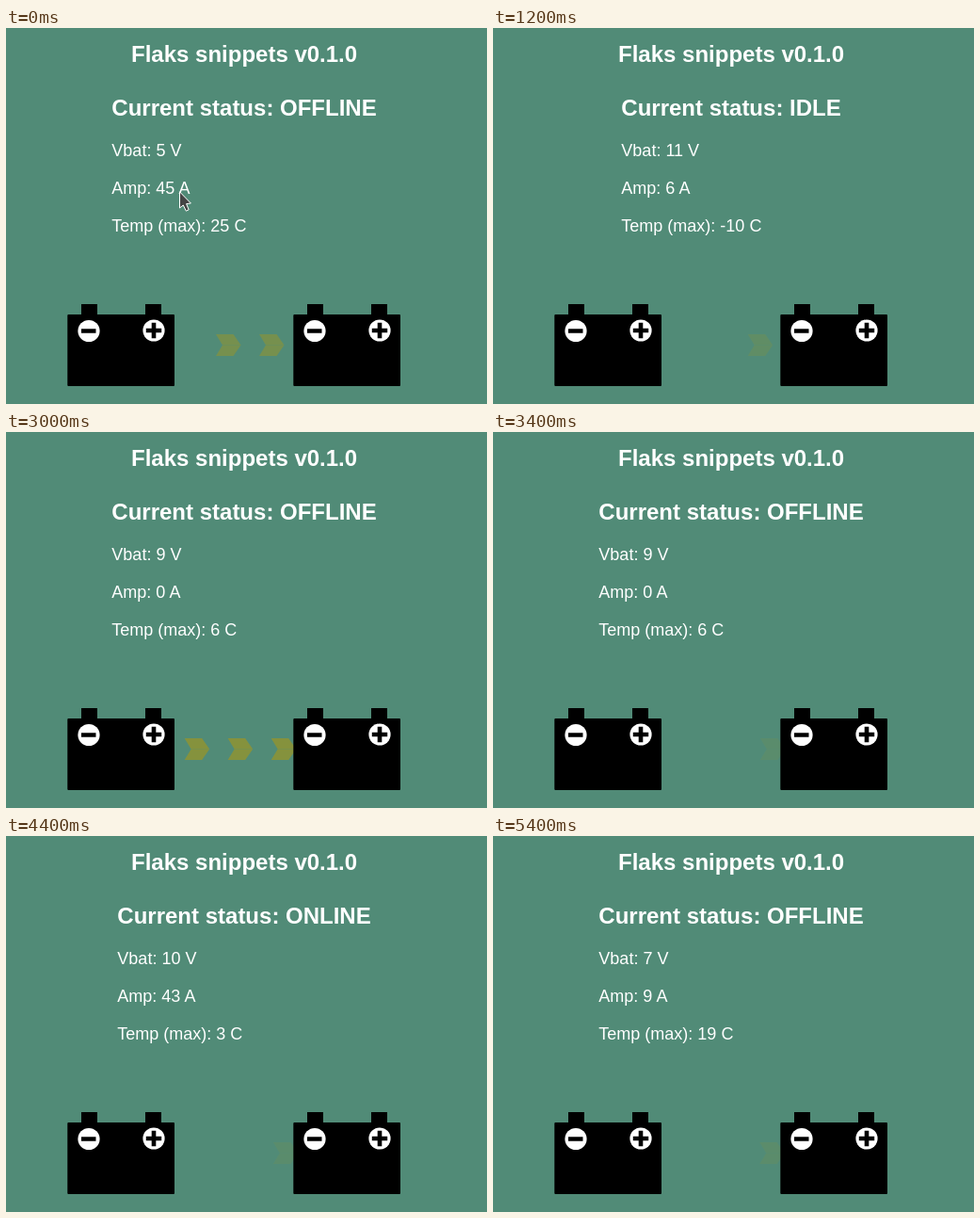
An HTML page for the animation above (5700 ms loop, 511 by 399 pixels).

```html
<!DOCTYPE html>
<html lang="en">
<head>
<meta charset="utf-8">
<title>Battery status</title>
<style>
  html, body { margin: 0; width: 100%; height: 100%; overflow: hidden; background: #518b77; }
  svg { display: block; }
  text { font: 18px "Liberation Sans", Arial, sans-serif; fill: #fff; }
  .head { font-size: 24px; font-weight: bold; }
</style>
</head>
<body>
<svg width="511" height="399" viewBox="0 0 511 399">
  <defs>
    <g id="arrow">
      <path d="M0 325H18.5L26.5 336.5H7Z"/>
      <path d="M0 348H18.5L26.5 336.5H7Z"/>
    </g>
    <g id="battery">
      <rect x="65.3" y="304" width="113.7" height="76" rx="1"/>
      <path d="M80 293h17v12h-17zM148 293h17v12h-17z"/>
      <g fill="#fff">
        <circle cx="88" cy="321.5" r="11.6"/>
        <circle cx="157" cy="321" r="11.6"/>
      </g>
      <path d="M80 319.2h15.5v4.6h-15.5zM148.8 318.7h16.4v4.6h-16.4zM154.7 312.8h4.6v16.4h-4.6z"/>
    </g>
  </defs>

  <text class="head" x="133" y="36">Flaks snippets v0.1.0</text>
  <g id="info">
    <text class="head" y="93"></text>
    <text y="136"></text>
    <text y="176"></text>
    <text y="216"></text>
  </g>

  <g id="arrows" fill="#be9b00">
    <use href="#arrow"/>
    <use href="#arrow" x="46"/>
    <use href="#arrow" x="92"/>
  </g>
  <use href="#battery"/>
  <use href="#battery" x="240"/>

  <path id="cursor" d="M.5 .8V18L4.3 15 7.3 21.2 10.2 19.8 7.6 13.6 12.4 13Z"
        fill="#444" stroke="#fff" stroke-linejoin="round"/>
</svg>
<script>
const LOOP = 5700, STEP = 100, TRAVEL = 240;
const left = { OFFLINE: 112.35, IDLE: 136.35, ONLINE: 118.35 };

// from: readings appear; start: arrows set off; hold: arrows freeze until the next cycle
const cycles = [
  { from: 0,    start: -476, hold: 200,  status: "OFFLINE", volt: 5,  amp: 45, temp: 25 },
  { from: 600,  start: 517,  hold: 1200, status: "IDLE",    volt: 11, amp: 6,  temp: -10 },
  { from: 1500, start: 1550, hold: 2300, status: "OFFLINE", volt: 11, amp: 8,  temp: 0 },
  { from: 2600, start: 2642, hold: 3400, status: "OFFLINE", volt: 9,  amp: 0,  temp: 6 },
  { from: 3700, start: 3642, hold: 4400, status: "ONLINE",  volt: 10, amp: 43, temp: 3 },
  { from: 4700, start: 4646, hold: 5400, status: "OFFLINE", volt: 7,  amp: 9,  temp: 19 },
];

const $ = id => document.getElementById(id);
const info = $("info"), arrows = $("arrows"), cursor = $("cursor");
const clamp = v => Math.min(1, Math.max(0, v));

// cubic-bezier(0, 0, .58, 1)
function easeOut(p) {
  let lo = 0, hi = 1;
  for (let i = 0; i < 24; i++) {
    const s = (lo + hi) / 2;
    if (1.74 * s * s - 0.74 * s ** 3 < p) lo = s; else hi = s;
  }
  return 3 * lo * lo - 2 * lo ** 3;
}

function showReadings(c) {
  info.setAttribute("transform", `translate(${left[c.status]} 0)`);
  const lines = [`Current status: ${c.status}`, `Vbat: ${c.volt} V`, `Amp: ${c.amp} A`, `Temp (max): ${c.temp} C`];
  lines.forEach((line, i) => info.children[i].textContent = line);
}

let shown;
function draw(t) {
  const c = cycles.findLast(c => t >= c.from);
  if (c !== shown) showReadings(shown = c);

  const y = easeOut(clamp((Math.min(t, c.hold) - c.start) / 1000));
  arrows.setAttribute("transform", `translate(${65 + TRAVEL * y} 0)`);
  arrows.setAttribute("opacity", 1 - y);

  // the pointer drifts a little, then leaves over the top edge
  const drift = clamp(t / 200), exit = clamp((t - 500) / 300);
  cursor.setAttribute("transform", `translate(${184 + 4 * drift + 30 * exit} ${173 + 3 * drift - 200 * exit})`);
  cursor.setAttribute("visibility", t < 800 ? "visible" : "hidden");
}

const begin = performance.now();
function tick() {
  const t = (performance.now() - begin) % LOOP;
  draw(Math.floor(t / STEP) * STEP);
  requestAnimationFrame(tick);
}
tick();
</script>
</body>
</html>
```
